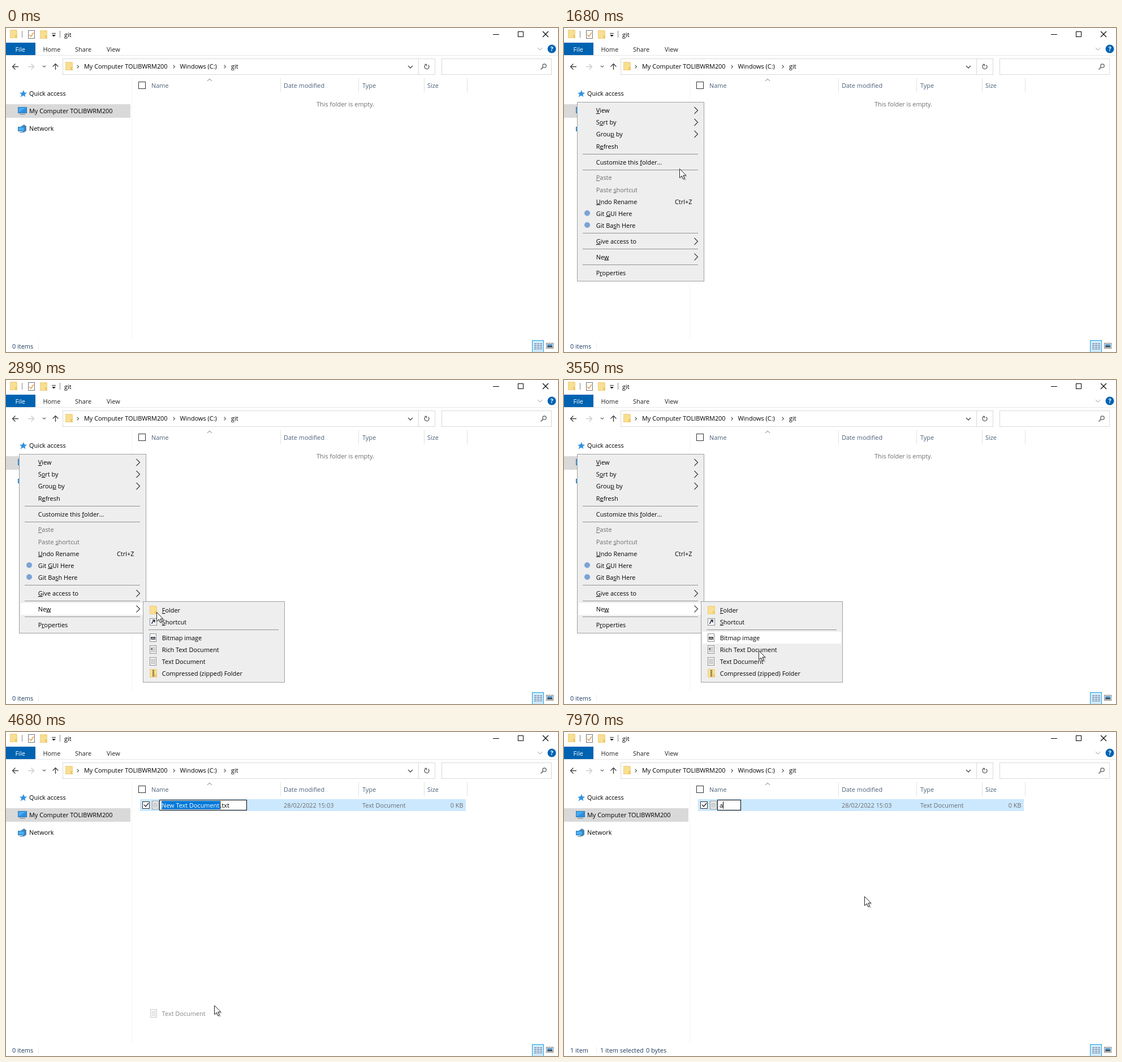
Animation of 976 by 574 pixels, one loop 8000 ms. Source, as an HTML page:

```html
<!DOCTYPE html>
<html lang="en">
<head>
<meta charset="utf-8">
<title>New text file</title>
<style>
html, body { margin: 0; width: 100%; height: 100%; overflow: hidden; background: #fff; }
svg { display: block; width: 976px; height: 574px; }
text { font: 10.9px "Open Sans", "Noto Sans", sans-serif; white-space: pre; }
.u { text-decoration: underline; }
.bold { font-weight: 700; }
</style>
</head>
<body>
<svg id="stage" viewBox="0 0 976 574"></svg>
<script>
const HEAD = '#4c607a', STATUS = '#1e395b', GREY = '#6d6d6d', PC = 'My Computer TOLIBWRM200';
const stage = document.getElementById('stage');

// Shape helpers; text is placed by its vertical centre.
const box = (x, y, w, h, fill, extra = '') =>
  `<rect x="${x}" y="${y}" width="${w}" height="${h}" fill="${fill}" ${extra}/>`;
const frame = (x, y, w, h, stroke, fill = '#fff') =>
  box(x + .5, y + .5, w - 1, h - 1, fill, `stroke="${stroke}"`);
const line = (d, stroke = '#444', width = 1, fill = 'none', extra = '') =>
  `<path d="${d}" fill="${fill}" stroke="${stroke}" stroke-width="${width}" ${extra}/>`;
const solid = (d, fill) => line(d, 'none', 0, fill);
const label = (x, y, s, fill = '#000', extra = '') =>
  `<text x="${x}" y="${y + 4}" fill="${fill}" ${extra}>${s.replace(/&(.)/, '<tspan class="u">$1</tspan>')}</text>`;
const group = (id, body) => `<g id="${id}">${body}</g>`;
const down = (x, y, r, color, w) => line(`M${x - r} ${y - r / 2}l${r} ${r}l${r} ${-r}`, color, w);
const right = (x, y, r, color, w) => line(`M${x - r / 2} ${y - r}l${r} ${r}l${-r} ${r}`, color, w);

// Icons
const folder = (x, y) => box(x, y, 13, 15, '#f8df91') + box(x + 9, y + 9, 4, 6, '#efca69') +
  line(`M${x + .5} ${y + .5}h9v2h3v12h-12z`, '#ecd083');
const page = (x, y) => frame(x, y, 12, 15, '#8d8d8d') +
  [3, 5, 7, 9, 11].map(d => box(x + 2, y + d, 8, 1, '#a5a5a5')).join('');
const bitmapPage = (x, y) => frame(x, y, 12, 15, '#8d8d8d') + box(x + 2, y + 6, 8, 5, '#454d55') +
  line(`M${x + 3} ${y + 10}l3 -2l3 2`, '#fff');
const richPage = (x, y) => page(x, y) + box(x + 2, y + 5, 3, 3, '#666');
const shortcut = (x, y) => frame(x, y + 1, 13, 13, '#8d8d8d') +
  line(`M${x + 4} ${y + 11}q0 -4 4 -5M${x + 5} ${y + 4.5}h4v4`, '#333f55', 1.8);
const zip = (x, y) => folder(x, y) + line(`M${x + 6.5} ${y + 1}v13`, '#8a7748', 3) +
  line(`M${x + 6.5} ${y + 1}v13`, '#eee', 1.5, 'none', 'stroke-dasharray="1 2"');
const dot = (x, y) => `<circle cx="${x + 6}" cy="${y + 7}" r="5" fill="#7ba3d6"/>`;
const checkbox = (x, y, on) => frame(x, y, 13, 13, '#333') +
  (on ? line(`M${x + 3} ${y + 6}l3 3l5 -6`, '#222', 1.3) : '');
const monitor = (x, y) => frame(x, y, 16, 11, '#2b78b5', '#45aaf2') +
  solid(`M${x + 1} ${y + 10}l14 -9v9z`, '#2d8fe0') + box(x + 3, y + 12, 10, 1.5, '#7f97a8');
const network = (x, y) => solid(`M${x + 6} ${y + 3}l5 -3l4 3v8l-4 3l-5 -3z`, '#4a86b8') +
  frame(x, y + 4, 12, 8, '#2b78b5', '#49aef2') + box(x + 3, y + 13, 7, 1.5, '#7d98ad');

const titleBar = folder(7, 3) + box(28, 5, 1, 12, '#888') + frame(39, 4, 12, 15, '#777') +
  line('M41 12l3 3l5 -7', '#d99a45', 1.4) + folder(60, 4) +
  box(81, 9, 7, 1, '#222') + solid('M81 12h7l-3.5 3.5z', '#222') +
  box(95, 5, 1, 12, '#888') + label(103, 12, 'git') +
  box(861, 11, 11, 1, '#000') + frame(905, 6, 10, 10, '#000') +
  line('M949 6l10 10m0 -10l-10 10', '#000', 1.1);

const ribbon = box(0, 26, 52, 22, '#0063b1') + label(16.5, 38, 'File', '#fff') +
  label(65.5, 38, 'Home', '#222') + label(122, 38, 'Share', '#222') + label(178, 38, 'View', '#222') +
  down(944, 37, 4, '#999') + '<circle cx="965" cy="37" r="7.5" fill="#0063b1"/>' +
  label(965, 37, '?', '#fff', 'text-anchor="middle" class="bold"') + box(0, 48, 976, 1, '#e8e8e8');

const addressBar = line('M22 68.5H11.5m5 -5l-5 5l5 5', '#444', 1.4) +
  line('M39 68.5H49.5m-5 -5l5 5l-5 5', '#ccc', 1.4) + down(67.5, 68, 2.5, '#666', 1.2) +
  line('M87.5 74V63.5m-5 5l5 -5l5 5', '#444', 1.4) +
  frame(100, 54, 659, 29, '#d9d9d9') + box(729, 55, 1, 27, '#d9d9d9') + folder(105, 60) +
  [127, 297, 387].map(x => right(x, 68.5, 2.8, '#555', 1.2)).join('') +
  label(138, 68, PC) + label(307.5, 68, 'Windows (C:)') + label(398, 68, 'git') +
  down(715, 69, 4, '#555', 1.5) +
  line('M746.5 65.5a4 4 0 1 1 -5 0M740.5 64.5h3v3', '#555', 1.3) +
  frame(770, 54, 195, 29, '#d9d9d9') +
  '<circle cx="952" cy="67" r="3.2" fill="none" stroke="#555" stroke-width="1.2"/>' +
  line('M949.5 69.5l-4 4', '#555', 1.5);

const columns = checkbox(234, 95) + line('M356 94l4 -4l4 4', '#777') +
  [['Name', 257], ['Date modified', 491], ['Type', 630], ['Size', 745]].map(([s, x]) => label(x, 102, s, HEAD)).join('') +
  [485, 623, 739, 815].map(x => box(x, 89, 1, 25, '#e2e2e2')).join('');

const sidebar = box(222, 88, 1, 463, '#f4f4f4') + box(0, 135, 220, 24, '#d9d9d9') +
  solid('M31 110l1.5 4.3l4.5 .5l-3.6 2.7l1 4.6l-4 -2.7l-5 3.2l2.2 -5l-3.6 -2.8l4.8 -.4z', '#2e8fe0') +
  label(41, 116, 'Quick access') + monitor(21, 140) + label(41, 147, PC) +
  network(21, 171) + label(41, 178, 'Network');

const viewButtons = frame(930, 553, 21, 22, '#26a0da', '#cce8ff') +
  [559, 562, 565, 568].map(y => [934, 939, 944].map(x => box(x, y, 4, 1, '#667')).join('')).join('') +
  frame(955, 558, 13, 10, '#777') + box(957, 560, 9, 6, '#4f94c9') + box(957, 563, 9, 3, '#46566a');

const fileRow = box(237, 119, 576, 21, '#cce8ff') + checkbox(241, 123, true) + page(258, 122) +
  label(491, 130, '28/02/2022 15:03', GREY) + label(630, 130, 'Text Document', GREY) +
  label(808.5, 130, '0 KB', GREY, 'text-anchor="end"');
const renameBox = (id, width, body) => group(id, frame(271, 120, width, 19, '#000') + body);
const selected = (width, text) => box(275, 122, width, 15, '#0078d7') +
  box(275 + width, 122, 1, 15, '#e89a4a') + label(275, 130, text, '#fff');

// Menus: [text, centre y, arrow, disabled state or icon]
const mainItems = [['&View', 146, '>'], ['S&ort by', 167, '>'], ['Grou&p by', 188, '>'], ['R&efresh', 209.5],
  ['Customize this &folder...', 237.5], ['&Paste', 265, 'off'], ['Paste &shortcut', 286.5, 'off'],
  ['&Undo Rename', 307.5], ['Git &GUI Here', 328.5, dot], ['Git Ba&sh Here', 350, dot],
  ['&Give access to', 378, '>'], ['Ne&w', 405.5, '>'], ['P&roperties', 433.5]];
const subItems = [['&Folder', 408, folder], ['&Shortcut', 429, shortcut], ['Bitmap image', 457, bitmapPage],
  ['Rich Text Document', 478, richPage], ['Text Document', 499, page], ['Compressed (zipped) Folder', 520, zip]];

const menu = (id, x, y, w, h, items, seps, more = '') => group(id,
  frame(x, y, w, h, '#a0a0a0', '#eee') + box(x + 3, 0, w - 6, 21, '#fff', `id="${id}Hover"`) +
  seps.map(s => box(x + 10, s, w - 21, 1, '#929292')).join('') +
  items.map(([s, c, kind]) => label(x + 33.8, c, s, kind === 'off' ? GREY : '#000') +
    (kind === '>' ? right(x + 210.5, c, 6, '#333', 1.1) : '') +
    (typeof kind === 'function' ? kind(x + 12, Math.round(c) - 8) : '')).join('') + more);

stage.innerHTML = titleBar + ribbon + addressBar + columns + sidebar + viewButtons +
  group('empty', label(600, 135, 'This folder is empty.', GREY, 'text-anchor="middle"')) +
  group('noItems', label(11, 564, '0 items', STATUS)) + box(57, 558, 1, 12, '#eee') +
  group('oneItem', label(11, 564, '1 item', STATUS) + label(64, 564, '1 item selected', STATUS) +
    label(145, 564, '0 bytes', STATUS)) +
  group('row', fileRow) +
  renameBox('nameOnly', 155, selected(104, 'New Text Document') + label(378.5, 130, '.txt')) +
  renameBox('wholeName', 155, selected(120, 'New Text Document.txt')) +
  renameBox('typed', 42, label(275, 130, 'a') + box(281, 123, 1, 13, '#000')) +
  group('fading', page(255, 491) + label(275.8, 499, 'Text Document')) +
  menu('main', 23, 131, 225, 318, mainItems, [223, 251, 363, 391, 419], label(196, 307.5, 'Ctrl+Z')) +
  menu('sub', 242, 392, 251, 144, subItems, [442]) +
  group('pointer', '<circle id="click" r="11.7" fill="#fffb50" fill-opacity=".9"/>' +
    '<g transform="translate(.5 .5)"><path d="M2 2V18L6 15L9 21L12 19.5L9.4 14H14Z" fill="#000" opacity=".16"/>' +
    line('M0 0V16L3.8 12.5L6.4 18.5L8.8 17.4L6.3 11.6H11.4Z', '#222', 1, '#fff') + '</g>');

const $ = id => document.getElementById(id);
const show = (id, alpha) => {
  $(id).style.display = alpha ? '' : 'none';
  $(id).style.opacity = +alpha;
};
const within = (t, from, to) => t >= from && t < to;
const fadeIn = (t, start) => t < start ? 0 : t < start + 60 ? .5 : 1;

// Pointer tip: [time, x, y]
const track = [[70, 710, 419], [200, 585, 339], [340, 280, 145], [405, 195, 91], [540, 242, 124], [610, 257, 136],
  [690, 257, 136], [880, 248, 131], [1415, 248, 131], [1550, 226, 186], [1680, 203, 252], [1880, 190, 326],
  [2080, 185, 372], [2220, 184, 388], [2420, 182, 404], [2710, 182, 404], [2890, 270, 411], [3090, 318, 423],
  [3420, 337, 462], [3550, 344, 479], [3690, 344.5, 503.5], [4490, 344.5, 503.5], [4680, 361, 487],
  [4890, 512, 418], [5080, 558, 357], [5290, 543, 320], [5430, 531, 291]];

function pointerAt(t) {
  const i = track.findIndex(k => k[0] > t);
  if (i < 0) return track.at(-1).slice(1);
  if (i === 0) return track[0].slice(1);
  const [t0, x0, y0] = track[i - 1], [t1, x1, y1] = track[i];
  const p = (t - t0) / (t1 - t0);
  return [x0 + (x1 - x0) * p, y0 + (y1 - y0) * p];
}

function hover(id, centre) {
  show(id, centre ? 1 : 0);
  if (centre) $(id).setAttribute('y', Math.round(centre) - 11);
}

function render(t) {
  const tick = Math.floor((t + 12) / 67) * 67; // the pointer moves 15 times a second
  const [x, y] = pointerAt(tick);
  $('pointer').setAttribute('transform', `translate(${Math.round(x)} ${Math.round(y)})`);
  show('pointer', t >= 70);
  show('click', within(t, 1080, 1220) || within(t, 2420, 2560) || within(t, 4350, 4550));

  const open = t < 4550;
  show('main', open && fadeIn(t, 1220));
  show('sub', open && fadeIn(t, 2620));
  const under = mainItems.find(([, c]) => Math.abs(y - c) <= 10.5);
  hover('mainHover', t >= 2290 ? 405.5 : t >= 1480 && under ? under[1] : 0);
  hover('subHover', t >= 3690 ? 499 : t >= 3620 ? 478 : t >= 3290 ? 457 : 0);

  const created = t >= 4620, counted = t >= 4890;
  show('fading', within(t, 4550, 4890) ? Math.max(0, 1 - (tick - 4480) / 400) : 0);
  show('empty', !created);
  show('noItems', !counted);
  show('oneItem', counted);
  show('row', created);
  show('nameOnly', within(t, 4620, 5980));
  show('wholeName', within(t, 5980, 7970));
  show('typed', t >= 7970);
}

const start = performance.now();
(function loop() {
  render((performance.now() - start) % 8000);
  requestAnimationFrame(loop);
})();
</script>
</body>
</html>
```
